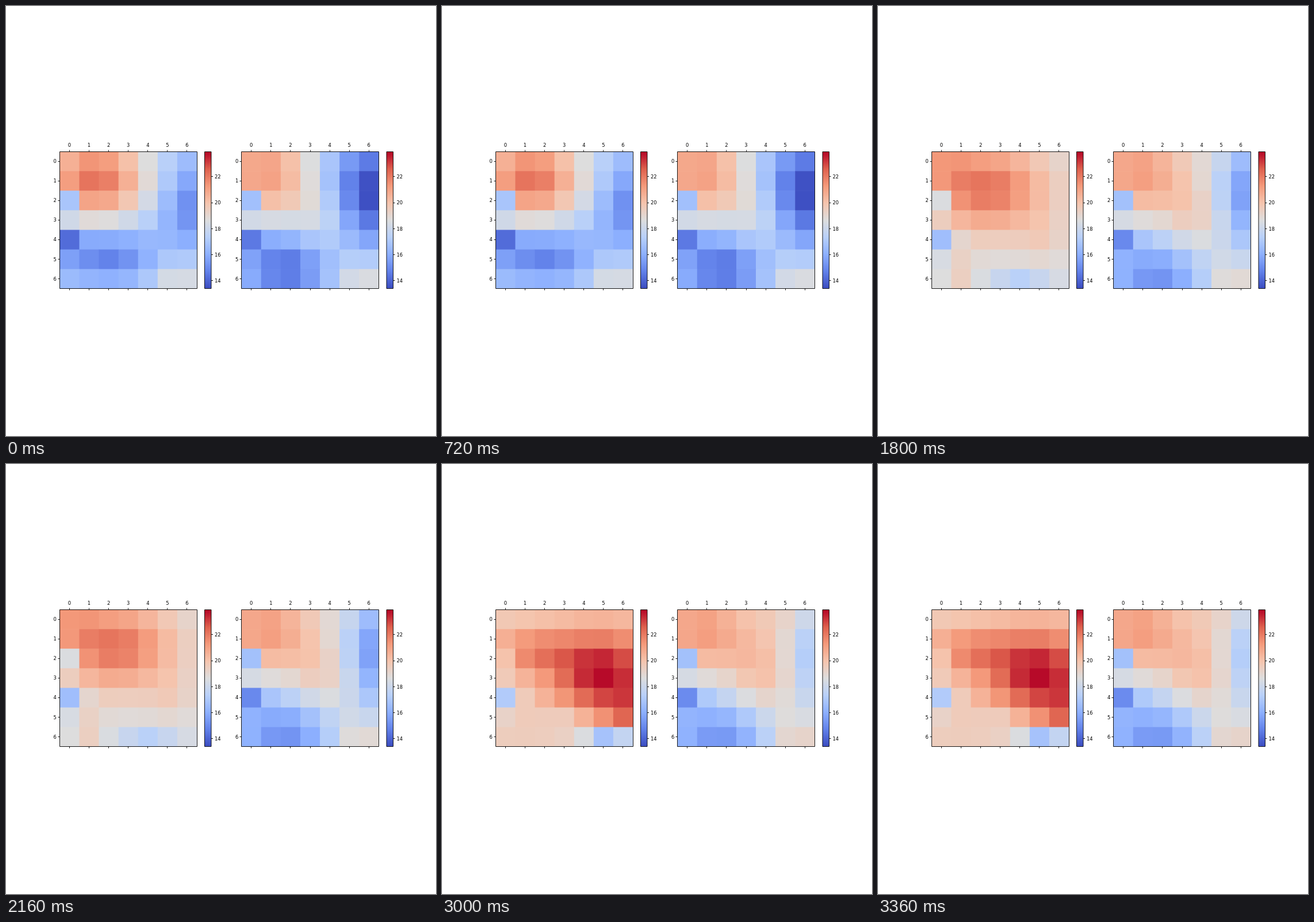
An HTML page that plays this animation: 748 px wide and 748 px high, repeating every 3600 ms.

```html
<!DOCTYPE html>
<html lang="en">
<head>
<meta charset="utf-8">
<title>Two heat maps</title>
<style>
  html, body { margin: 0; width: 100%; height: 100%; overflow: hidden; background: #fff; }
  svg { display: block; width: 748px; height: 748px; }
  text { font: 8.33px "DejaVu Sans", sans-serif; }
  .line { fill: none; stroke: #000; stroke-width: .9; }
</style>
</head>
<body>
<svg id="stage" viewBox="0 0 748 748">
  <defs><linearGradient id="scale" x1="0" y1="1" x2="0" y2="0"></linearGradient></defs>
</svg>
<script>
const N = 7, TOP = 253.1, SIZE = 238.6, CELL = SIZE / N;
const MIN = 13.42, MAX = 23.9, BAR_TOP = 254, BAR_BOTTOM = 491;
const STOPS = [[59, 76, 192], [98, 130, 234], [141, 176, 254], [184, 208, 249],
  [221, 221, 221], [245, 196, 173], [244, 154, 123], [222, 96, 77], [180, 4, 38]];

// A spot of heat is [column, row, strength, width, height]; a field sums them
const field = (base, spots) => (col, row) => spots.reduce((sum, [x, y, heat, w, h = w]) =>
  sum + heat * Math.exp(-(((col - x) / w) ** 2) - ((row - y) / h) ** 2), base);

// Two cells at the left edge stay cooler than their neighbours
const upperCold = strength => [0, 2, -3.4 * strength, .5];
const lowerCold = [0, 4, -2.5, .7];

// Left panel: the hot centre wanders to the lower right
const leftFields = [
  [16.8, [1.3, .9, 5.4, 2.9, 2.3], [6.2, 2.2, -2, 1.6, 2],
    [1.9, 4.7, -2.4, 2.2, 1.2], [5.5, 6.3, 2, 1.3]],
  [17.5, [1.6, 1.1, 5.6, 3.2, 2.3], [.6, 5.8, 1.2, 1.2],
    [3, 5, -.9, 1.5], [6, 3.8, -.9, 1], [6, 6, 1.3, .7]],
  [18.5, [2.3, 1.4, 3.7, 3.2, 2.3], [0, 0, 1.3, 1.3],
    [1, 5.6, 1.2, .7], [4, 6.2, -1.3, 1.4, .6], [5.2, 4, .7, 1.2]],
  [18.8, [3.7, 2.4, 4.1, 3.2, 2.8], [.8, 1, .9, 1.2],
    [1.2, 4.6, -1.3, 1.2], [4.9, 6.3, -3.2, 1.1, .6]],
  [19.5, [5, 2.8, 4.3, 2.8, 2.3], [1.3, 1.6, 1.9, 2.2, 1.2],
    [6.2, 4.8, 1.6, 1], [3, 5.2, -1, 1.2, .8], [5.3, 6.3, -4.6, 1.3, .6]],
].map(([base, ...spots], step) =>
  field(base, [...spots, upperCold(1 - .75 * step / 4), lowerCold]));
const LAST = leftFields.length - 1;

// Right panel: a fixed field that warms up, sooner on the left than on the right
const cool = field(17, [[.6, .6, 4.2, 2.9], [6.2, 1.6, -3.9, 2.5], [1.7, 5.2, -3, 2],
  [3.6, 3, 1.6, 1.8], [5.6, 6.2, 1.9, 1.3], upperCold(1), lowerCold]);
const gain = field(0, [[5.3, 1.2, 4.3, 2.3, 3.6], [1.8, 4.7, 1.6, 1.8, 1.4]]);
const warmed = (col, row, step) =>
  cool(col, row) + gain(col, row) * (1 - (1 - step / LAST) ** (3 - .3 * col));

function color(value) {
  const p = Math.min(1, Math.max(0, (value - MIN) / (MAX - MIN))) * (STOPS.length - 1);
  const n = Math.min(STOPS.length - 2, Math.floor(p));
  return `rgb(${STOPS[n].map((c, j) => Math.round(c + (STOPS[n + 1][j] - c) * (p - n)))})`;
}

const stage = document.getElementById("stage");

function add(tag, attrs, parent = stage) {
  const el = document.createElementNS("http://www.w3.org/2000/svg", tag);
  for (const key in attrs) el.setAttribute(key, attrs[key]);
  parent.append(el);
  return el;
}

const snap = v => Math.floor(v) + .5;
const line = d => add("path", { d, class: "line" });
const label = (x, y, anchor, value) =>
  add("text", { x, y, "text-anchor": anchor }).textContent = value;

// Draws one heat map with its colour bar; returns a function that paints a step
function panel(left, barX, valueAt) {
  const cells = Array.from({ length: N * N }, (_, i) => {
    const col = i % N, row = Math.floor(i / N);
    // A slight overlap hides the seams
    const rect = add("rect", { x: left + col * CELL, y: TOP + row * CELL,
      width: CELL + (col < N - 1 && .6), height: CELL + (row < N - 1 && .6) });
    return { rect, col, row };
  });
  const x0 = snap(left), x1 = snap(left + SIZE), y0 = snap(TOP), y1 = snap(TOP + SIZE);
  line(`M${x0} ${y0}H${x1}V${y1}H${x0}Z`);
  for (let n = 0; n < N; n++) {
    const x = left + (n + .5) * CELL, y = TOP + (n + .5) * CELL;
    line(`M${snap(x)} ${y0}v-3M${snap(x)} ${y1}v3M${x0} ${snap(y)}h-3`);
    label(x, 245, "middle", n);
    label(left - 5.5, y + 3, "end", n);
  }

  const height = BAR_BOTTOM - BAR_TOP, barEnd = barX + 11.5;
  add("rect", { x: barX, y: BAR_TOP, width: 11.5, height, fill: "url(#scale)" });
  line(`M${barX} ${BAR_TOP - .5}H${barEnd}V${BAR_BOTTOM + .5}H${barX}Z`);
  for (let v = 14; v <= 22; v += 2) {
    const y = BAR_BOTTOM - (v - MIN) / (MAX - MIN) * height;
    line(`M${barEnd} ${snap(y)}h3`);
    label(barEnd + 6, y + 3.1, "start", v);
  }
  return step => cells.forEach(({ rect, col, row }) =>
    rect.setAttribute("fill", color(valueAt(col, row, step))));
}

STOPS.forEach((c, i) => add("stop",
  { offset: i / (STOPS.length - 1), "stop-color": `rgb(${c})` }, document.getElementById("scale")));

const paintLeft = panel(93.4, 345.5, (col, row, step) => leftFields[step](col, row));
const paintRight = panel(409.7, 662, warmed);

let shown = -1;
function draw() {
  // The first step lasts twice as long as the others
  const step = Math.max(0, Math.floor(performance.now() % 3600 / 600) - 1);
  if (step !== shown) {
    shown = step;
    paintLeft(step);
    paintRight(step);
  }
  requestAnimationFrame(draw);
}
draw();
</script>
</body>
</html>
```
